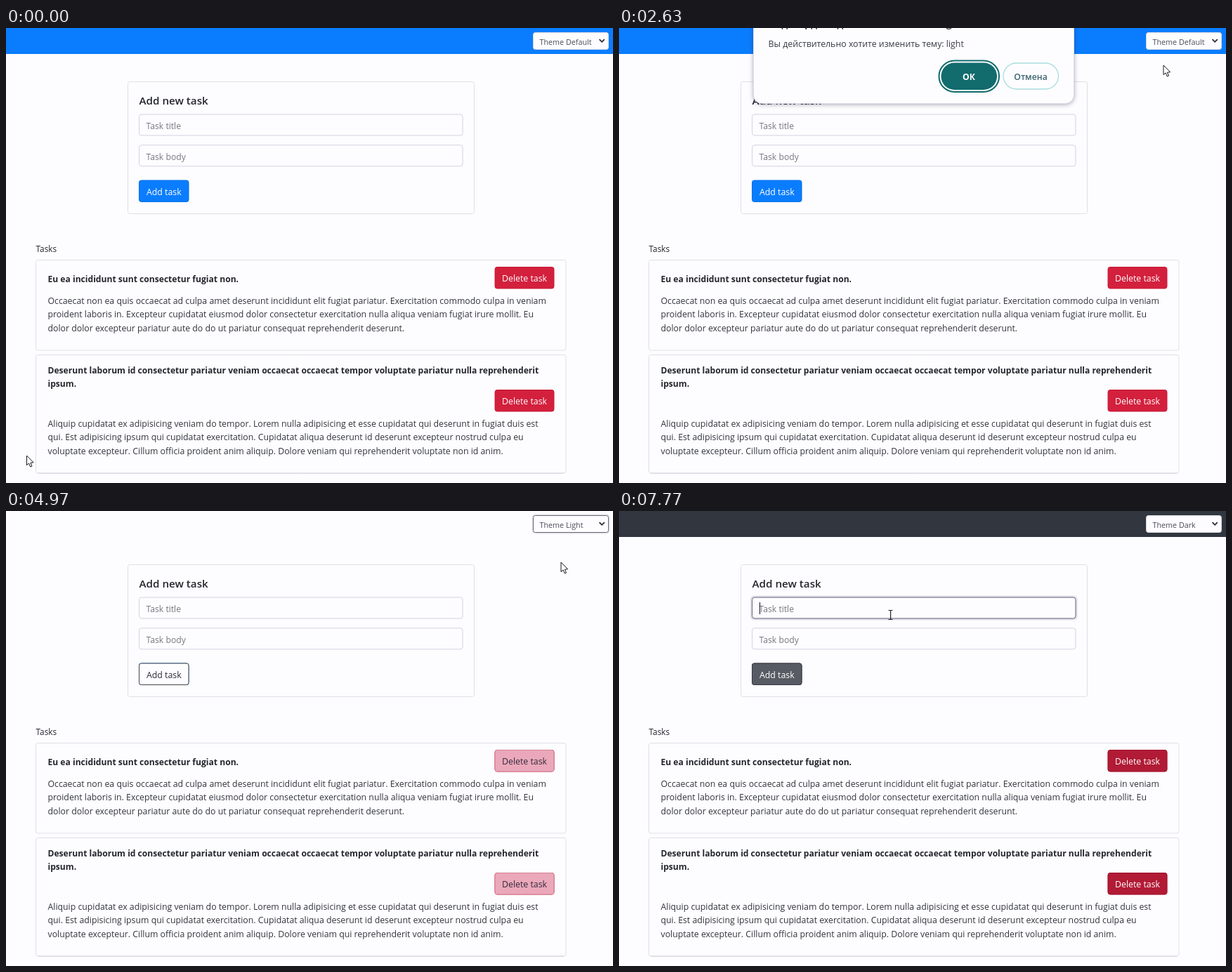
Recreate the animation shown at these times as an HTML page with a canvas. Size 864 by 648 pixels, loop 8000 ms.

```html
<!DOCTYPE html>
<html lang="en">
<head>
<meta charset="utf-8">
<title>Task list themes</title>
<style>
html, body { margin: 0; width: 100%; height: 100%; overflow: hidden; background: #fdfdff; }
canvas { display: block; width: 864px; height: 648px; }
</style>
</head>
<body>
<canvas id="stage" width="864" height="648"></canvas>
<script>
const ctx = document.getElementById('stage').getContext('2d');
const LOOP = 8000;
const FONT = '"Open Sans", "Noto Sans", sans-serif';
const PAGE = '#fdfdff', INK = '#24262c', MUTED = '#77787f', LINE = '#dfdfe7';
const PITCH = 19.6;

const THEMES = {
  default: {
    label: 'Theme Default', bar: '#0a7dfe',
    add: { fill: '#0a7dfe', line: '#0570e8', ink: '#fff' },
    del: { fill: '#d3203d', line: '#c91c3c', ink: '#fff' },
  },
  light: {
    label: 'Theme Light', bar: PAGE,
    add: { fill: PAGE, line: '#45444b', ink: '#2b2d35' },
    del: { fill: '#eaa8ba', line: '#d67f94', ink: '#33293a' },
  },
  dark: {
    label: 'Theme Dark', bar: '#32363f',
    add: { fill: '#575b63', line: '#363941', ink: '#fff' },
    del: { fill: '#b11b35', line: '#a2132f', ink: '#fff' },
  },
};
const NAMES = Object.keys(THEMES);

const TASKS = [
  {
    y: 330.5, h: 128.5, del: 340.5, titleY: 361.5, bodyY: 392.8,
    title: ['Eu ea incididunt sunt consectetur fugiat non.'],
    body: [
      'Occaecat non ea quis occaecat ad culpa amet deserunt incididunt elit fugiat pariatur. Exercitation commodo culpa in veniam',
      'proident laboris in. Excepteur cupidatat eiusmod dolor consectetur exercitation nulla aliqua veniam fugiat irure mollit. Eu',
      'dolor dolor excepteur pariatur aute do do ut pariatur consequat reprehenderit deserunt.',
    ],
  },
  {
    y: 465.5, h: 168.5, del: 515.5, titleY: 491.8, bodyY: 567.8,
    title: [
      'Deserunt laborum id consectetur pariatur veniam occaecat occaecat tempor voluptate pariatur nulla reprehenderit',
      'ipsum.',
    ],
    body: [
      'Aliquip cupidatat ex adipisicing veniam do tempor. Lorem nulla adipisicing et esse cupidatat qui deserunt in fugiat duis est',
      'qui. Est adipisicing ipsum qui cupidatat exercitation. Cupidatat aliqua deserunt id deserunt excepteur nostrud culpa eu',
      'voluptate excepteur. Cillum officia proident anim aliquip. Dolore veniam qui reprehenderit voluptate non id anim.',
    ],
  },
];

// Pointer stops: time, x, y
const PATH = [
  [30, 29.5, 609], [1250, 783, 20], [1450, 783, 22], [1630, 781.5, 30],
  [1700, 781.5, 31], [2030, 775, 53], [2670, 775, 53], [3030, 772, 56],
  [3250, 772, 56], [3700, 783.5, 24], [4030, 785, 17], [4170, 785, 17],
  [4670, 790, 73], [5365, 790, 73], [5370, 788, 73], [5640, 788, 73],
  [5765, 782, 71], [5800, 782, 71], [6430, 408, 154], [6530, 386.5, 148],
];

const SWITCHES = [
  { to: 'light', open: 1460, shut: 2470, ask: 2490, done: 3230 },
  { to: 'dark', open: 3940, shut: 4970, ask: 5000, done: 5630 },
];
const FOCUS = 6700;

const clamp = v => Math.max(0, Math.min(1, v));
const ramp = (t, from, span) => clamp((t - from) / span);
const ease = k => k * k * (3 - 2 * k);

// Baselines sit on whole pixels to keep the glyphs sharp
function text(str, x, y, size, color = INK, weight = 400, align = 'left') {
  ctx.font = `${weight} ${size}px ${FONT}`;
  ctx.textAlign = align;
  ctx.fillStyle = color;
  ctx.fillText(str, x, Math.round(y));
}

function box(x, y, w, h, r, fill, line, width = 1) {
  ctx.beginPath();
  ctx.roundRect(x, y, w, h, r);
  if (fill) { ctx.fillStyle = fill; ctx.fill(); }
  if (line) { ctx.strokeStyle = line; ctx.lineWidth = width; ctx.stroke(); }
}

function withAlpha(alpha, draw) {
  if (alpha <= 0) return;
  ctx.save();
  ctx.globalAlpha = alpha;
  draw();
  ctx.restore();
}

function shadow(color, blur, dy) {
  ctx.shadowColor = color;
  ctx.shadowBlur = blur;
  ctx.shadowOffsetY = dy;
}

function pointerAt(t) {
  const i = PATH.findIndex(p => p[0] > t);
  if (i === 0) return PATH[0].slice(1);
  if (i < 0) return PATH[PATH.length - 1].slice(1);
  const [t0, x0, y0] = PATH[i - 1], [t1, x1, y1] = PATH[i];
  const k = ease((t - t0) / (t1 - t0));
  return [x0 + (x1 - x0) * k, y0 + (y1 - y0) * k];
}

function button(x, y, w, label, style) {
  box(x, y, w, 30.5, 3, style.fill, style.line);
  text(label, x + w / 2, y + 20.9, 12.35, style.ink, 400, 'center');
}

function buttons(theme) {
  button(189.5, 217, 70.5, 'Add task', theme.add);
  for (const task of TASKS) button(696, task.del, 84, 'Delete task', theme.del);
}

function input(y, label, focus) {
  box(189.5, y, 460.5, 30, 3.5, PAGE, '#d2d2e0');
  withAlpha(focus, () => {
    box(188, y - 1.5, 463.5, 33, 4.5, null, '#dfdfe9', 2);
    box(189.5, y, 460.5, 30, 3.5, null, '#6a6a80');
  });
  text(label, 199.5, y + 20.7, 12.2, MUTED);
}

function page(t) {
  box(173.5, 76.5, 493, 188, 3, PAGE, LINE);
  text('Add new task', 189.5, 109, 15.2, INK, 600);
  input(123, 'Task title', ramp(t, FOCUS, 150));
  input(166.8, 'Task body', 0);
  const since = t - FOCUS;
  if (since >= 0 && Math.floor(since / 533) % 2 === 0) {
    ctx.fillStyle = '#111';
    ctx.fillRect(200, 130, 1, 17);
  }
  text('Tasks', 42.5, 319, 11.8);
  for (const task of TASKS) {
    box(42.5, task.y, 754.5, task.h, 3, PAGE, LINE);
    task.title.forEach((s, i) => text(s, 59.5, task.titleY + i * PITCH, 12.1, INK, 700));
    task.body.forEach((s, i) => text(s, 59.5, task.bodyY + i * PITCH, 12.3, '#32343b'));
  }
  ctx.fillStyle = '#d3d3dd';
  ctx.fillRect(45, 633.5, 749, 1);
}

function picker(name, t) {
  const glow = 1 - ramp(t, FOCUS, 150);
  if (name === 'light') box(749.5, 5.5, 109, 26, 4, null, '#e4e3ec', 2);
  if (name === 'dark') withAlpha(glow, () => box(749, 5, 110, 26.5, 4.5, null, '#777b85', 2));
  box(750.5, 6.5, 107, 24, 3, '#fdfdff', name === 'light' ? '#67656e' : '#d4d6e2');
  text(THEMES[name].label, 759.5, 23.7, 10.75, '#4b4d55');
  ctx.beginPath();
  ctx.moveTo(844.6, 16.2);
  ctx.lineTo(848.2, 19.8);
  ctx.lineTo(851.8, 16.2);
  ctx.strokeStyle = '#2a2c34';
  ctx.lineWidth = 1.8;
  ctx.stroke();
}

function menu(selected, y) {
  ctx.save();
  shadow('rgba(0,0,0,.35)', 5, 2);
  box(749.5, 30.5, 106.5, 46.5, 0, PAGE);
  ctx.restore();
  box(749.5, 30.5, 106.5, 46.5, 0, null, '#70737c');
  const hover = y < 31 ? NAMES.indexOf(selected) : Math.min(2, Math.floor((y - 31) / 15.4));
  NAMES.forEach((name, i) => {
    const top = 31 + i * 15.4;
    if (i === hover) {
      ctx.fillStyle = '#1d62cd';
      ctx.fillRect(750, top, 105.5, 15.4);
    }
    text(THEMES[name].label, 758.8, top + 12, 10.35, i === hover ? '#fff' : '#484a53');
  });
}

function dialog(theme) {
  ctx.save();
  shadow('rgba(40,40,70,.45)', 6, 1);
  box(191.5, -40, 456, 147.5, 12, PAGE);
  ctx.restore();
  box(191.5, -40, 456, 147.5, 12, null, '#dcdce8');
  text('Подтвердите действие на noteslab.github.io', 212.5, -1, 14.2, INK, 600);
  text('Вы действительно хотите изменить тему: ' + theme, 212.5, 27, 12.35, '#3a3c46');
  box(455.5, 46.5, 85.5, 44.5, 22, PAGE, '#126b6d', 2);
  box(458.5, 49.5, 79.5, 38.5, 19, '#126b6d');
  text('ОК', 498, 73.6, 12.2, '#fff', 700, 'center');
  box(547, 50, 78.5, 37, 18.5, PAGE, '#a9dde0', 1.3);
  text('Отмена', 586, 73.6, 12.2, '#3c6670', 600, 'center');
}

function arrow(x, y) {
  const pts = [[0, 0], [0, 13.6], [3.1, 10.9], [5.3, 16], [7.5, 15], [5.4, 10.2], [9.6, 9.8]];
  ctx.beginPath();
  for (const [dx, dy] of pts) ctx.lineTo(x + dx, y + dy);
  ctx.closePath();
  ctx.fillStyle = '#fff';
  ctx.fill();
  ctx.strokeStyle = '#16161c';
  ctx.lineWidth = 1;
  ctx.stroke();
}

function beam(x, y) {
  ctx.fillStyle = '#222228';
  ctx.fillRect(x - 0.5, y - 6.5, 1.2, 13);
  ctx.fillRect(x - 3, y - 7, 6, 1);
  ctx.fillRect(x - 3, y + 6, 6, 1);
}

function draw(t) {
  const [x, y] = pointerAt(t);
  const passed = SWITCHES.filter(s => t >= s.done + 40);
  const last = passed[passed.length - 1];
  const name = last ? last.to : 'default';

  ctx.fillStyle = PAGE;
  ctx.fillRect(0, 0, 864, 648);
  ctx.fillStyle = THEMES[name].bar;
  ctx.fillRect(0, 0, 864, 37);
  page(t);
  if (last) {
    buttons(THEMES[NAMES[passed.length - 1]]);
    withAlpha(ramp(t, last.done + 40, 100), () => buttons(THEMES[name]));
  } else {
    buttons(THEMES.default);
  }
  picker(name, t);

  for (const s of SWITCHES) {
    if (t >= s.open && t < s.shut) menu(name, y);
    const shown = ramp(t, s.ask, 140) * (1 - ramp(t, s.done, 90));
    withAlpha(shown, () => dialog(s.to));
  }

  const overInput = x > 189 && x < 650 && y > 123 && y < 197 && t > 6000;
  (overInput ? beam : arrow)(x, y);
}

function tick() {
  draw(performance.now() % LOOP);
  requestAnimationFrame(tick);
}
tick();
</script>
</body>
</html>
```
